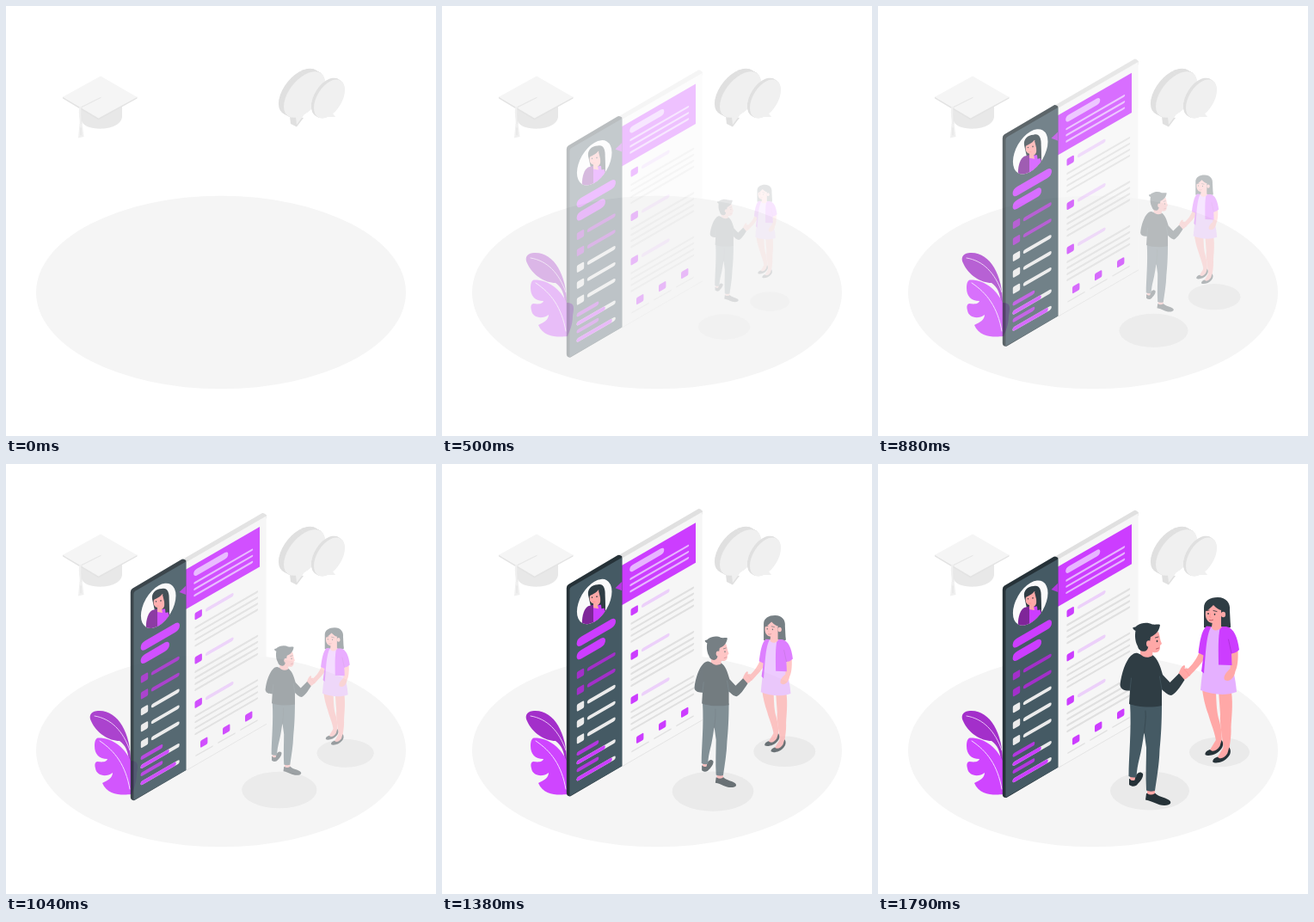
Write an HTML page with a canvas that moves like this. It is 500 px wide and 500 px high and loops after 1.83 s.

```html
<!DOCTYPE html>
<html lang="en">
<head>
<meta charset="utf-8">
<title>Handshake beside a profile page</title>
<style>
html, body { margin: 0; width: 100%; height: 100%; overflow: hidden; background: #fff; }
canvas { display: block; width: 100vw; height: 100vh; }
</style>
</head>
<body>
<canvas id="stage"></canvas>
<script>
const SIZE = 500, LOOP = 1830, STEPS = 44;
const SLOPE = Math.tan(Math.PI / 6);
const PURPLE = '#cc3dff', VIOLET = '#b436e0', DEEP = '#a32fca', PALE = '#e7b5ff',
      INK = '#263238', CLOTH = '#2f3d44', SLATE = '#455a64',
      SKIN = '#ffa8a7', BLUSH = '#ff8f8f', GREY = '#e0e0e0', LIGHT = '#ebebeb', MIST = '#f0f0f0';

const stage = document.getElementById('stage');
const sheet = document.createElement('canvas');
const ratio = Math.max(1, window.devicePixelRatio || 1);
for (const c of [stage, sheet]) c.width = c.height = SIZE * ratio;
const main = stage.getContext('2d'), over = sheet.getContext('2d');
let g = main;

function fill(color, d) {
  g.fillStyle = color;
  g.fill(new Path2D(d));
}
function line(color, width, d) {
  g.strokeStyle = color;
  g.lineWidth = width;
  g.lineCap = g.lineJoin = 'round';
  g.stroke(new Path2D(d));
}
function oval(color, x, y, rx, ry) {
  g.fillStyle = color;
  g.beginPath();
  g.ellipse(x, y, rx, ry, 0, 0, Math.PI * 2);
  g.fill();
}

// Runs draw on the slanted plane, with its origin at x, y.
function slanted(x, y, draw) {
  g.save();
  g.transform(1, -SLOPE, 0, 1, x, y);
  draw();
  g.restore();
}
function bar(color, x, y, endX, width) {
  slanted(x, y, () => line(color, width, `M0 0H${endX - x}`));
}
function tile(color, x, y, size = 8.4) {
  slanted(x, y, () => {
    g.fillStyle = color;
    g.beginPath();
    g.roundRect(-size / 2, -size / 2, size, size, 1.6);
    g.fill();
  });
}

// Flattens a group before it fades.
function layer(alpha, draw, scale = 1, cx = 0, cy = 0, dy = 0) {
  over.setTransform(1, 0, 0, 1, 0, 0);
  over.clearRect(0, 0, sheet.width, sheet.height);
  over.setTransform(ratio * scale, 0, 0, ratio * scale,
    ratio * cx * (1 - scale), ratio * (cy * (1 - scale) + dy));
  g = over;
  draw();
  g = main;
  main.globalAlpha = Math.max(0, Math.min(1, alpha));
  main.drawImage(sheet, 0, 0, SIZE, SIZE);
  main.globalAlpha = 1;
}

function bezier(x1, y1, x2, y2) {
  const at = (a, b, s) => 3 * (1 - s) ** 2 * s * a + 3 * (1 - s) * s * s * b + s ** 3;
  return x => {
    let lo = 0, hi = 1;
    for (let i = 0; i < 30; i++) {
      const mid = (lo + hi) / 2;
      if (at(x1, x2, mid) < x) lo = mid; else hi = mid;
    }
    return at(y1, y2, lo);
  };
}
const rebound = bezier(.36, -.01, .5, 1.38);
const easeIn = bezier(.42, 0, 1, 1);

function drawCap() {
  fill('#e8e8e8', 'M87 112 L88 133 C89 146 133 147 135 129 V115 L108 125Z');
  fill('#e3e3e3', 'M66 105.5 L107.5 130 L152.5 105.5 V107.5 L107.5 132.5 L66 107.5Z');
  fill('#f5f5f5', 'M66 105.7 L110 81.5 L152.5 106 L107.5 130.5Z');
  line('#e6e6e6', 1.2, 'M110 106.5 L87 118');
  line(MIST, 2.4, 'M86.5 118 C85 124 87 130 87 138');
  line('#e2e2e2', .7, 'M88 119 C87 125 88 131 88 137');
  fill(MIST, 'M85.5 137 H88.5 L90.5 152 L84 153.5Z');
  line(GREY, .8, 'M87 142 V150');
}

function drawBubble(x, y, rx, ry, depth) {
  for (let d = depth; d >= 0; d -= .5) {
    slanted(x - d, y - d * SLOPE, () => oval(d ? GREY : MIST, 0, 0, rx, ry));
  }
}
function drawBubbles() {
  fill(GREY, 'M330 128 L331 137 L338 140.5 L346 130Z');
  drawBubble(347, 103, 24, 23, 6);
  fill(MIST, 'M337 129 L338 138 L347 126Z');
  drawBubble(376, 108, 18, 20, 3);
  fill(MIST, 'M371 129 L383 129 L378 122Z');
}

function drawPlant() {
  fill(DEEP, 'M145 345 C145 312 129 284 105 287.3 C98 288 96 294 99 299 C105 313 120 322 132 322 C139 327 142 334 143 345Z');
  line('#f0d4fa', .9, 'M103 293 C122 296 136 310 144 333');
  fill('#cf45ff', 'M107 318.5 C122 318 137 328 145 345 C154 345 154 350 152 360 C152 372 148 378 146 384 C136 385 118 386 112 371 C118 368 124 365 124 359 C116 365 105 362 104 354 C103 350 103 347 106 346 C114 347 117 346 118 343 C108 343 103 337 103 328 C103 323 104 319 107 318.5Z');
  line('#f5dcff', 1, 'M109 322 C127 334 139 350 144 378');
}

function drawPortrait() {
  g.save();
  g.beginPath();
  slanted(177.2, 161.7, () => g.ellipse(0, 0, 20.3, 23.4, 0, 0, Math.PI * 2));
  g.fillStyle = '#fafafa';
  g.fill();
  g.clip();
  fill(CLOTH, 'M170 154 C169 147 174 142 181 142 C188 140 190 147 189.5 154 L190 172 L174 172Z');
  fill('#7f2699', 'M163 192 C162 179 165 170 170 167 L178 165 L188 167 L191 175 V192Z');
  fill(PURPLE, 'M176 167 L187 165 C190 172 190 180 189 192 H176Z');
  fill(SKIN, 'M172 155 C175 153 179 152 182 148 C184 150 184.5 154 184.5 158 C184.5 163 183 165 181 166 L182 170 L176 169 L176 164 C172 163 171 159 172 155Z');
  fill(CLOTH, 'M182 149 L189 147 L190 169 L185.5 170 L184 157Z');
  line(BLUSH, .8, 'M175.5 162 L178 162');
  oval(INK, 174.5, 156.8, .6, .8);
  oval(INK, 180, 155.8, .7, .9);
  g.restore();
}

function drawPage() {
  fill(GREY, 'M206 107.5 L298 54 Q300 53 303 56.5 L303 60 L210 112Z');
  fill('#f6f6f6', 'M209 111.3 L302.6 57.3 V299.2 L209 353.3Z');
  line(GREY, .8, 'M210 353 L302.6 299.4');
  fill(PURPLE, 'M209 119.6 L295 70 V116.3 L209 165.9Z');
  bar(PALE, 222, 122.5, 254.5, 7.6);
  for (let i = 0; i < 3; i++) bar(PALE, 219.5, 135.2 + i * 7.2, 286, 2.4);

  for (let s = 0; s < 3; s++) {
    const y = 172 + s * 51.4;
    tile(PURPLE, 223.7, y);
    bar('#ecd0fa', 234, y - 6, 262.5, 4.2);
    for (let i = 0; i < 4; i++) bar(GREY, 220.5, y + 15 + i * 7, 292, 2.4);
  }
  for (let i = 0; i < 3; i++) {
    tile(PURPLE, 230.2 + i * 26, 320.5 - i * 15);
    bar(GREY, 221 + i * 26, 336 - i * 15, 240 + i * 26, 1.5);
  }
}

function drawSidebar() {
  fill(INK, 'M144.8 146 Q144.8 143 147 141.6 L204 108 Q206 106.5 209.3 109 V352.8 L149.5 388 Q144.8 388.5 144.8 384Z');
  fill(SLATE, 'M148.4 148 Q148.4 145.6 150.6 144.3 L209.3 110.4 V352.8 L148.4 387.8Z');
  fill(VIOLET, 'M201.5 146 L209.3 138.5 V149Z');
  drawPortrait();
  bar(PURPLE, 161.8, 207.6, 196.8, 10.4);
  bar(PURPLE, 161.8, 223, 184.8, 10.4);
  for (let i = 0; i < 5; i++) {
    const color = i < 2 ? DEEP : LIGHT, y = 245.4 + i * 18.9;
    tile(color, 161, y);
    bar(color, 171, y - 5.6, 199.5, 4.4);
  }
  bar(VIOLET, 158.8, 338, 180, 4.6);
  bar(LIGHT, 158.8, 348.2, 199.5, 4.6);
  bar(PURPLE, 158.8, 348.2, 187.5, 4.6);
  bar(VIOLET, 158.8, 357.2, 180, 4.6);
  bar(LIGHT, 158.8, 367.4, 199.5, 4.6);
  bar(PURPLE, 158.8, 367.4, 195.5, 4.6);
}

function drawShadows() {
  oval('#eaeaea', 316, 380, 46, 22.5);
  oval('#eaeaea', 397, 335, 35, 17.3);
}

function drawPump() {
  fill(SKIN, 'M393.5 320 H399.5 L400 329 L390 337 L385 334Z');
  fill(INK, 'M399.5 321 C402 324 401.5 329 398.5 332 C394 338 384 340.5 380.5 338 C380 335 383 333 386 332 C389 335.5 394 333.5 397.5 328Z');
}

function drawWoman() {
  // legs and shoes
  fill(SKIN, 'M377 262 L393 264 C393.5 280 394 290 397 299 C399.5 308 400 315 399.5 323 L393.5 325 C392 312 387 302 384 291 C380 280 378 270 377 262Z');
  fill(SKIN, 'M396 264 L411 265 C413 280 411 296 410.5 306 C411 318 409 326 408 335 L402 336 C401 318 397 304 398 291Z');
  drawPump();
  g.save();
  g.translate(8.8, 8.6);
  drawPump();
  g.restore();
  // far arm and hair
  fill(SKIN, 'M373.5 219 L381 223 C377 232 369 239 362 247 L356 242 C363 236 369 230 373.5 219Z');
  fill(CLOTH, 'M379 190 V167 C379 159 386 155 395 155 C405 155 410 162 409 170 L410 190 L395 194Z');
  // dress
  fill('#e5b0ff', 'M381 191 L389 189 L400 189 L405 197 L407 220 C412 234 416 250 417 265 C404 270 388 268 375 263 C376 250 378 236 380 222Z');
  fill(PURPLE, 'M382 188.5 L387.5 189 C381 200 381 225 379 243.5 L376 241 L378.5 222.5 L372.5 219.5 C374 208 376 193 382 188.5Z');
  fill(SKIN, 'M411 219 L418.5 217 C419 228 418 236 415.5 241 C414 250 408 254 403 251 C401 247 405 242 409.5 238Z');
  fill(PURPLE, 'M398 189 L405 189 C414 191 418 201 420 216 C417 219 414 220 411 220.5 L411.5 234 L396 233.5 C396 218 395 202 398 189Z');
  line(DEEP, .7, 'M411 220 L407.5 204');
  // head
  fill(SKIN, 'M389 182 L399.5 180 L399.5 190 C395 195 389 194 388 190Z');
  fill(SKIN, 'M381 171 C384 170 387 167 390 164 C394 168 397 170 400 170 C404 171 405 177 400 179 C398 184 393 186 389 185 C382 184 380 178 381 171Z');
  fill(CLOTH, 'M399 170 L405 165 L410 189 L399 189Z');
  oval(SKIN, 401.5, 175, 2.6, 3.3);
  line(INK, .8, 'M382 170.5 L385 170 M390 170.5 L394 171.5');
  oval(INK, 384, 174, .8, 1.1);
  oval(INK, 391.5, 174.8, .8, 1.1);
  line(BLUSH, .8, 'M386.5 174 L385.5 178 L387 178.3');
  line('#b64b55', .8, 'M385.5 181.5 Q387.5 182.3 389.5 181.3');
}

function drawMan() {
  // shoes and trousers
  fill(INK, 'M292 366 L292 373 C296 376 300 375 302 372 C305 369 309 364 308 360 C304 356 300 360 298 367Z');
  fill(SKIN, 'M293 361 H300 L298.5 367.5 Q295 369 293 366.5Z');
  fill(INK, 'M312 383 L311 390.5 C320 392 325 397 333 397 C341 397 342 393 338 390.5 C333 387.5 326 387 322 382.5Z');
  fill(SKIN, 'M313 378 H322 V383 Q317 386 313 383Z');
  fill(SLATE, 'M293 277 L330 279 C330 300 329 318 327.5 332 C327 350 324 366 322 380 Q316 381.5 312 379.5 C311 362 312 345 312 330 L309.5 312 C308 322 306 335 304 342 C302 350 301 356 300.5 364 Q296 365.5 291.5 363 C291.5 340 295 310 293 277Z');
  line('#37474f', .8, 'M311 287 C312 297 310 305 309.5 313');
  // joined hands
  fill(SKIN, 'M349 245 C351 240 353 234.5 356 234 C357.5 234.5 357 236 356.5 238 C360 236 364.5 240 363.5 243.5 C361 249 357 250.5 354.5 251.5Z');
  line(BLUSH, .6, 'M356 239 C359 241 361 244 361.5 246');
  // sweater
  fill(CLOTH, 'M302 220 C308 223 314 223 319 222 C325 226 328 234 331 245 L339.5 254 L350 243.5 L356.5 251 C351 260 345 268 341 269 C337 269 332 264 330 262 L330 281 C316 284 300 282 292 279 L293 263.5 C287 264 282 262 281.5 257 C283 243 288 229 294 223 C297 220 300 219 302 220Z');
  line(SLATE, .7, 'M293 263 L294.5 249 M330 262 L327.5 247');
  // head
  fill(SKIN, 'M305 213 L320 213 L319 223 C314 226 308 225 305 221Z');
  fill(SKIN, 'M311 200 L326 195 C328 200 327.5 204 330 209 L328 211 C328.5 217 326 220 320 219 L311 215Z');
  fill(CLOTH, 'M296.5 190 C299 190 300 189 301 188 C307 184 314 184 319 186.5 C323 187 326 186 328 187 C327 195 322 199 317 201 L316 207 L313.5 215 C311 220 303 218 302 212 C298 205 299 196 299.5 194 C297 193 296 191 296.5 190Z');
  oval(SKIN, 314.8, 209, 2.8, 3.7);
  line(INK, .8, 'M322.5 202 L326 201');
  oval(INK, 324.5, 206, .8, 1.2);
  line('#b64b55', .8, 'M323.5 215 L326.5 214');
}

function paint(step) {
  main.setTransform(ratio, 0, 0, ratio, 0, 0);
  main.fillStyle = '#fff';
  main.fillRect(0, 0, SIZE, SIZE);
  oval('#f5f5f5', 250, 333, 215, 112.3);
  drawCap();
  drawBubbles();
  if (step < 4) return;

  const x = (step + 1) / STEPS;
  const rise = rebound(x), grow = easeIn(x);
  layer(rise, drawPlant);
  layer(rise, () => { drawPage(); drawSidebar(); }, 1, 0, 0, 30 * (1 - rise));
  layer(rise, drawShadows, .5 + rise / 2, 351, 360);
  layer(grow, () => { drawWoman(); drawMan(); }, .5 + grow / 2, 350.5, 276);
}

let start = null, shown = -1;
function tick(now) {
  if (start === null) start = now;
  const t = (now - start) % LOOP;
  const step = Math.min(STEPS - 1, Math.floor(t / LOOP * STEPS + .1));
  if (step !== shown) paint(shown = step);
  requestAnimationFrame(tick);
}
paint(shown = 0);
requestAnimationFrame(tick);
</script>
</body>
</html>
```
